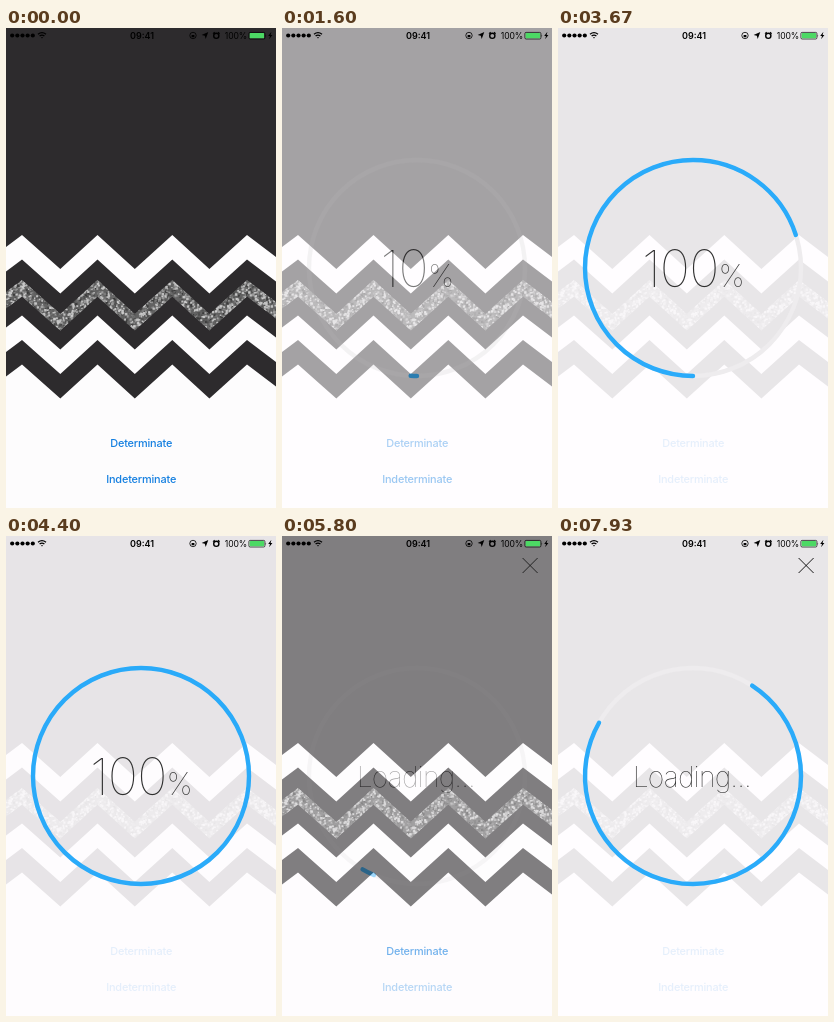
Recreate the animation shown at these times as an HTML page. Size 270 px wide and 480 px high, loop 8 s.

```html
<!DOCTYPE html>
<html lang="en">
<head>
<meta charset="utf-8">
<title>Circular spinner</title>
<style>
  html, body { margin: 0; width: 100%; height: 100%; overflow: hidden; background: #fdfcfd; }
  svg { display: block; width: 100vw; height: 100vh; }
  text { font-family: Inter, Roboto, sans-serif; font-optical-sizing: none; text-anchor: middle; }
  .button { font-size: 10.9px; font-weight: 450; letter-spacing: -.015em; fill: #147fe0; }
  .status { font-size: 8.6px; letter-spacing: -.01em; }
  .clock { font-size: 9px; font-weight: 600; }
  .title { fill: #303030; }
  #percent { font-size: 51px; font-weight: 140; letter-spacing: -.015em; }
  #loading text { font-size: 28.5px; font-weight: 100; letter-spacing: -.03em; }
</style>
</head>
<body>
<svg viewBox="0 0 270 480">
  <defs><clipPath id="band"><path id="bandShape"/></clipPath></defs>

  <rect width="270" height="480" fill="#fdfcfd"/>
  <path id="dark" fill="#2d2b2d"/>
  <path id="upper" fill="#fefdfe"/>
  <path id="lower" fill="#fefdfe"/>
  <g id="glitter" clip-path="url(#band)"><rect y="245" width="270" height="62" fill="#626262"/></g>

  <text id="determinate" class="button" x="135.2" y="419.3">Determinate</text>
  <text id="indeterminate" class="button" x="135.2" y="455.3">Indeterminate</text>

  <g id="overlay">
    <rect width="270" height="480" fill="#fffdff" fill-opacity=".89"/>
    <g fill="none" stroke-width="4.4">
      <circle cx="135" cy="240" r="108" stroke="#eeecee"/>
      <circle id="arc" cx="135" cy="240" r="108" pathLength="1" stroke="#2aabfa" stroke-linecap="round"/>
    </g>
    <text id="percent" class="title" x="135" y="258.5"><tspan id="value"></tspan><tspan font-size="31">%</tspan></text>
    <g id="loading">
      <text class="title" x="133.8" y="250.5">Loading...</text>
      <path d="M240.6 22l15 15m0-15l-15 15" stroke="#000" stroke-width=".9" fill="none"/>
    </g>
  </g>

  <g id="statusBar">
    <g id="signal"></g>
    <g fill="none" stroke="#000" stroke-width="1.3">
      <path d="M32 6.2q4-3.2 8 0M33.6 8q2.4-1.9 4.8 0"/>
      <circle cx="187" cy="7.5" r="3.2" stroke-width=".8"/>
      <circle cx="210.3" cy="7.8" r="2.6" stroke-width="1.4"/>
      <path d="M207 5.6l1.7-1.5m3.3 0l1.7 1.5" stroke-width="1.1"/>
    </g>
    <path d="M34.8 9.2h2.4L36 10.6zM185.6 7h2.8v2.2h-2.8zM202.3 4l-2.6 7-.9-3.2-3.2-.9zM265.4 3.8l-3.2 4.2h1.8l-.9 3.2 3.3-4.3h-1.8z"/>
    <text class="clock" x="136" y="10.7">09:41</text>
    <text class="status" x="230" y="10.6">100%</text>
    <rect x="242.9" y="4.4" width="16" height="6.6" rx="1.2" fill="none" stroke="#000" stroke-width=".7"/>
    <rect x="243.7" y="5.1" width="14.4" height="5.2" rx=".6" fill="#4cd964"/>
    <path d="M259.6 6.4q1.2 1.3 0 2.6z"/>
  </g>
</svg>

<script>
const $ = id => document.getElementById(id);
const LOOP = 8000;
const AMPLITUDE = 34;
const CORNERS = [-29, 16, 54.3, 91.5, 128.8, 166.3, 203.4, 241, 286];

function make(parent, tag, attrs) {
  const node = document.createElementNS('http://www.w3.org/2000/svg', tag);
  for (const key in attrs) node.setAttribute(key, attrs[key]);
  parent.append(node);
}

// Zigzag edge whose peaks lie at the given height.
const zigzag = y => CORNERS.map((x, i) => [x, y + (i % 2 ? 0 : AMPLITUDE)]);
const shape = points => 'M' + points.map(p => p.join(' ')).join('L') + 'Z';
const stripe = (top, bottom) => shape([...zigzag(top), ...zigzag(bottom).reverse()]);

function buildScene() {
  $('dark').setAttribute('d', shape([[-29, 0], [286, 0], ...zigzag(336.5).reverse()]));
  $('upper').setAttribute('d', stripe(207, 231.5));
  $('lower').setAttribute('d', stripe(287.5, 312));
  $('bandShape').setAttribute('d', stripe(252, 268.5));

  let seed = 7;
  const random = () => (seed = seed * 16807 % 2147483647) / 2147483647;
  for (const shade of [50, 130, 75, 170, 100, 215]) {
    let d = '';
    for (let i = 0; i < 900; i++) {
      const x = random() * 270, y = 250 + random() * 53, size = (1.2 + random() * 1.4).toFixed(1);
      d += `M${x.toFixed(1)} ${y.toFixed(1)}h${size}v${size}h-${size}z`;
    }
    make($('glitter'), 'path', { d, fill: `rgb(${shade},${shade},${shade})`, opacity: .8 });
  }
  for (let i = 0; i < 5; i++) make($('signal'), 'circle', { cx: 6.2 + i * 5.15, cy: 7.5, r: 2.1 });
}

// Cubic Bezier timing with control points (x1, 0) and (x2, 1).
const bezier = (x1, x2) => p => {
  if (p <= 0) return 0;
  if (p >= 1) return 1;
  let low = 0, high = 1;
  for (let i = 0; i < 24; i++) {
    const u = (low + high) / 2, v = 1 - u;
    if (3 * v * v * u * x1 + 3 * v * u * u * x2 + u * u * u < p) low = u; else high = u;
  }
  return low * low * (3 - 2 * low);
};
const easeOut = bezier(0, .58);
const easeInOut = bezier(.42, .58);

const SHOW = 1450, HIDE = 4400, SPIN = 5703, FADE = 330;
const steps = [[SHOW, .1], [2550, .7], [3650, 1]];

function setArc(start, end, turn = 0) {
  const arc = $('arc');
  arc.setAttribute('visibility', end - start > .0005 ? 'visible' : 'hidden');
  arc.setAttribute('stroke-dasharray', `${end - start} 2`);
  arc.setAttribute('transform', `rotate(${90 + 360 * (start + turn)} 135 240)`);
}

function drawProgress(t) {
  let progress = 0, label = .1;
  for (const [at, value] of steps) {
    if (t < at) break;
    progress += (value - progress) * easeInOut((t - at) / 700);
    label = value;
  }
  $('value').textContent = Math.round(label * 100);
  setArc(0, progress);
}

function drawSpinner(t) {
  const phase = Math.max(0, t - SPIN) / 1500 % 1;
  setArc(easeInOut((phase - 1 / 3) * 1.5), easeInOut(phase * 1.5), phase);
}

// A pressed button dims at once and then recovers.
const pressed = (t, at) => t < at ? 1 : .2 + .8 * easeInOut((t - at - 10) / 280);

function render(t) {
  const spinning = t >= SPIN;
  const alpha = spinning
    ? easeOut((t - SPIN) / FADE)
    : easeOut((t - SHOW) / FADE) - easeOut((t - HIDE) / FADE);
  $('overlay').setAttribute('opacity', alpha);
  $('overlay').setAttribute('display', alpha > 0 ? 'inline' : 'none');
  $('percent').setAttribute('display', spinning ? 'none' : 'inline');
  $('loading').setAttribute('display', spinning ? 'inline' : 'none');
  (spinning ? drawSpinner : drawProgress)(t);
  $('determinate').setAttribute('opacity', pressed(t, 1400));
  $('indeterminate').setAttribute('opacity', pressed(t, 5670));
}

buildScene();
const began = performance.now();
function tick() {
  render((performance.now() - began) % LOOP);
  requestAnimationFrame(tick);
}
tick();
</script>
</body>
</html>
```
